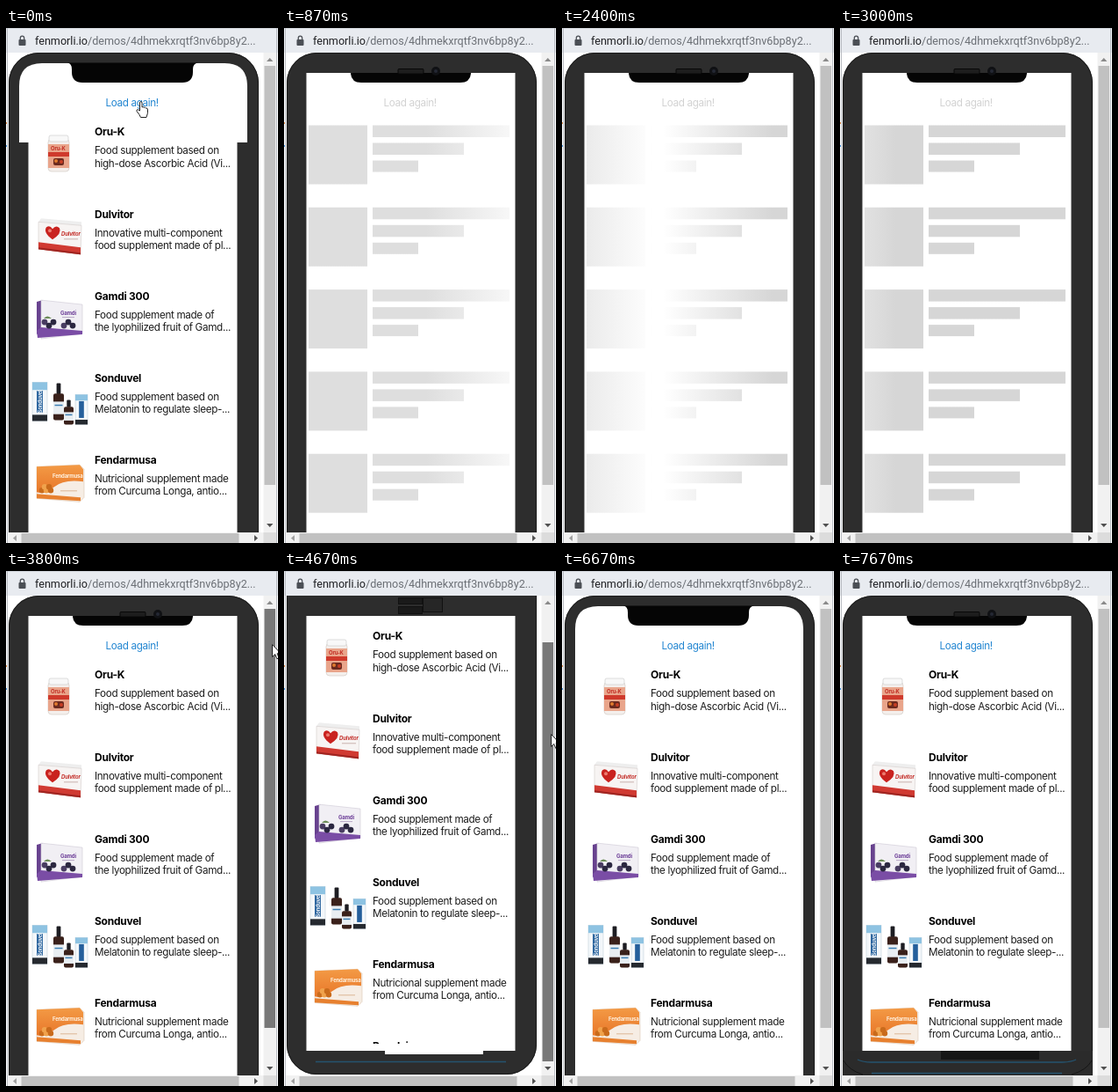
An HTML page that plays this animation: 310 px wide and 585 px high, repeating every 8340 ms.

```html
<!DOCTYPE html>
<html lang="en">
<head>
<meta charset="utf-8">
<title>Product list with loading placeholder</title>
<style>
html, body { margin: 0; width: 100%; height: 100%; overflow: hidden; background: #fff; }
svg { display: block; width: 310px; height: 585px; }
text { font-family: Inter, Roboto, sans-serif; font-size: 11.7px; letter-spacing: -.35px; fill: #1c1c1c; }
.name { font-size: 12px; font-weight: 700; letter-spacing: -.25px; fill: #000; }
.url { font-family: Roboto, sans-serif; font-size: 12.6px; letter-spacing: 0; fill: #6b6f75; }
.tiny { font-size: 6px; font-weight: 700; letter-spacing: -.2px; }
</style>
</head>
<body>
<svg viewBox="0 0 310 585">
  <defs>
    <linearGradient id="shine" gradientUnits="userSpaceOnUse" x1="-130" x2="130" y1="0" y2="0">
      <stop offset="0" stop-color="#dedede"/>
      <stop offset=".48" stop-color="#fff"/>
      <stop offset=".52" stop-color="#fff"/>
      <stop offset="1" stop-color="#d6d6d6"/>
    </linearGradient>
    <linearGradient id="orange" x2="0" y2="1">
      <stop offset="0" stop-color="#f39a45"/>
      <stop offset="1" stop-color="#e8772a"/>
    </linearGradient>
    <clipPath id="view"><rect id="viewBox" x="15" y="51" width="260"/></clipPath>
    <clipPath id="peek"><rect y="570" width="310" height="11"/></clipPath>
  </defs>

  <rect width="310" height="585" fill="#fff"/>

  <g id="body">
    <rect x="3" y="28" width="285" height="588" rx="34" fill="#2d2d2d"/>
    <rect x="3.5" y="28.5" width="284" height="587" rx="34" fill="none" stroke="#1b1b1b"/>
    <path d="M36 601.500H253" stroke="#24536f" stroke-width="1.500"/>
  </g>
  <path id="wide" fill="#fff"/>
  <rect id="narrow" x="25.500" y="51" width="238" fill="#fff"/>
  <g id="residue" fill="#1a1a1a" stroke="#111">
    <rect x="130.500" y="30.500" width="27" height="7"/>
    <rect x="130.500" y="40.500" width="27" height="8"/>
    <rect x="158.500" y="30.500" width="22" height="16" fill="#262626"/>
  </g>

  <g clip-path="url(#view)">
    <g id="content">
      <path id="notch" d="M76 50.500H213V52Q212 62 201 62H88Q77 62 76 52Z" fill="#050505"/>
      <text id="load" x="113.500" y="89">Load again!</text>
      <g id="list"></g>
      <g id="bones" fill="url(#shine)"></g>
    </g>
  </g>
  <g id="tallNotch">
    <path d="M70 39.500H219Q213 40 213 47V50Q213 62 201 62H87Q75 62 75 50V47Q75 40 70 39.500Z" fill="#050505"/>
  </g>
  <g id="sensors">
    <rect x="130" y="46.500" width="29" height="5.500" rx="1" fill="#1d1d1d" stroke="#080808"/>
    <circle cx="173" cy="49" r="5" fill="#101114"/>
    <circle cx="173" cy="49" r="2" fill="#242833"/>
  </g>
  <rect id="homeBar" x="115" y="545" width="112" height="4" fill="#fff"/>
  <g id="foot">
    <rect x="3" y="545" width="285" height="28" fill="#2b2b2b"/>
    <rect x="115" y="545" width="112" height="10" fill="#161616"/>
    <path d="M20 555Q26 558 36 558H253Q263 558 269 555M36 570.500H253" fill="none" stroke="#24536f" stroke-width="1.300"/>
    <path d="M4 556Q10 567 26 572M287 556Q281 567 264 572" fill="none" stroke="#151515"/>
  </g>

  <rect x="293.500" y="28" width="14.500" height="545" fill="#f1f1f1"/>
  <rect id="thumb" x="294.500" width="12.500" height="476"/>
  <path d="M297 38L300.700 34L304.400 38Z" fill="#8a8a8a"/>
  <path d="M297 563L300.700 567L304.400 563Z" fill="#505050"/>
  <rect x="2" y="573" width="306" height="12" fill="#f1f1f1"/>
  <rect x="17.500" y="574" width="248" height="11" fill="#c1c1c1"/>
  <path d="M12 576L8 579.500L12 583Z" fill="#a0a0a0"/>
  <path d="M283 576L287 579.500L283 583Z" fill="#505050"/>
  <rect x="293.500" y="573" width="14.500" height="12" fill="#dcdcdc"/>

  <rect width="310" height="28" fill="#e8ebf0"/>
  <path d="M0 .5H310" stroke="#cfd3da"/>
  <path d="M1.500 0V585M308.500 0V585" stroke="#b9bcc2"/>
  <path d="M0 108h1" stroke="#e8914a" stroke-width="2"/>
  <path d="M0 134h1" stroke="#4a9be8" stroke-width="2"/>
  <rect x="14.500" y="13" width="8" height="7" rx="1" fill="#4b4f55"/>
  <path d="M16.300 13V11.500a2.200 2.400 0 0 1 4.400 0V13" fill="none" stroke="#4b4f55" stroke-width="1.300"/>
  <text class="url" x="33" y="18.500"><tspan fill="#202124">fenmorli.io</tspan>/demos/4dhmekxrqtf3nv6bp8y2...</text>

  <path id="hand" transform="translate(148 83)" fill="#fff" stroke="#222" stroke-linejoin="round"
    d="M4.500 11V2Q4.500 .5 5.700 .5T7 2V7Q8 6 9.300 7.300Q10.500 6.500 11.400 8Q13.500 7.500 13.500 10V13.500L12 18.500H5.500L4 15.500L1 11.500Q.5 9.500 2.500 9.700Z"/>
  <path id="arrow" fill="#fff" stroke="#222" stroke-linejoin="round"
    d="M.5 .5V14.500L3.700 11.500L5.900 16.700L8.200 15.700L6 10.700H10.300Z"/>
</svg>
<script>
const $ = id => document.getElementById(id);
const LOOP = 8340, PITCH = 93.3;
const LOAD_START = 200, LOAD_END = 3470, WIDE_START = 5400, WIDE_END = 7470, MAX_SCROLL = 44;

const items = [
  ['Oru-K', 'Food supplement based on', 'high-dose Ascorbic Acid (Vi...'],
  ['Dulvitor', 'Innovative multi-component', 'food supplement made of pl...'],
  ['Gamdi 300', 'Food supplement made of', 'the lyophilized fruit of Gamd...'],
  ['Sonduvel', 'Food supplement based on', 'Melatonin to regulate sleep-...'],
  ['Fendarmusa', 'Nutricional supplement made', 'from Curcuma Longa, antio...']
];

const rect = (x, y, w, h, fill, more = '') =>
  `<rect x="${x}" y="${y}" width="${w}" height="${h}" fill="${fill}" ${more}/>`;
const path = (d, fill, more = '') => `<path d="${d}" fill="${fill}" ${more}/>`;
const dot = (x, y, r, fill) => `<circle cx="${x}" cy="${y}" r="${r}" fill="${fill}"/>`;
const tiny = (x, y, fill, s, more = '') => `<text class="tiny" x="${x}" y="${y}" style="fill:${fill}" ${more}>${s}</text>`;

const bottle = (x, y, w, h) =>
  rect(x + w * .3, y, w * .4, h * .3, '#1d1d22', 'rx="1"') +
  rect(x, y + h * .28, w, h * .72, '#3a211b', 'rx="2"') +
  rect(x, y + h * .5, w, h * .34, '#e9eef2') +
  rect(x + 1.5, y + h * .58, w - 3, 1.5, '#3d7fb4');

const carton = (x, y, w, h) =>
  rect(x, y, w, h, '#f3f7fa', 'stroke="#c3d0da" stroke-width=".6"') +
  rect(x, y, w, h * .2, '#8ec3e2') +
  rect(x + w * .3, y + h * .22, w * .4, h * .56, '#245f9b') +
  rect(x, y + h * .84, w, h * .16, '#25292f');

// Product drawings, relative to the top of each row
const art = [
  rect(48, 16, 24, 37, '#f4efec', 'rx="4" stroke="#d5cdc8" stroke-width=".7"') +
  rect(49, 12, 22, 7, '#f8f8f8', 'rx="2" stroke="#cfcfcf" stroke-width=".7"') +
  rect(48, 22, 24, 27, '#e9a58b') + rect(48, 31, 24, 5, '#cf3a2c') +
  rect(54, 38, 12, 8, '#6b2a1f', 'rx="2"') + dot(57, 41, 2, '#e07a2f') + dot(63, 42, 2, '#c93e25') +
  tiny(51, 29, '#c22f25', 'Oru-K'),

  path('M37 17L40 13L86 17V22L37 20Z', '#eee') +
  path('M37 17L86 21L85 54L37 48Z', '#f7f4f3', 'stroke="#d4cdcb" stroke-width=".6"') +
  path('M37 40L85 46V54L37 48Z', '#d03a32') + path('M37 46L85 52V54L37 48Z', '#9f2420') +
  path('M53 37Q42 29 46 23Q50 20 53 25Q57 20 61 24Q64 30 53 37Z', '#c9221f') + dot(50, 27, 2, '#ec7b70') +
  tiny(63, 33, '#c4302b', 'Dulvitor', 'font-style="italic"') + rect(66, 36, 16, 1, '#c9b2ae'),

  path('M35 14L42 12V46L35 51Z', '#68428f') +
  path('M40 12L87 17V50L40 56Z', '#f1eff4', 'stroke="#cfc9d6" stroke-width=".6"') +
  path('M35 47L40 43L87 47V51L36 55Z', '#7a4da5') +
  [44, 49, 54, 66, 71, 76].map((x, i) => dot(x, 37 + i % 2 * 4, 3.4, i % 3 ? '#2b2740' : '#493d62')).join('') +
  path('M43 33Q47 28 52 33Z', '#6b8c57') +
  tiny(62, 29, '#6d3f98', 'Gamdi') + rect(64, 31, 14, 1, '#b6a8c6'),

  carton(30, 12, 17, 44) + tiny(0, 0, '#f4f8fb', 'Sonduvel', 'transform="translate(40.500 47) rotate(-90)"') +
  bottle(54, 13, 12, 42) + bottle(66, 32, 11, 28) + carton(79, 26, 14, 34),

  path('M35 15L84 13L89 18V50L84 55L35 51Z', '#f6ede4', 'stroke="#dcc6b3" stroke-width=".6"') +
  path('M35 15L84 13L88 18V32Q66 29 55 38T35 44Z', 'url(#orange)') +
  path('M35 46L85 50V54L35 51Z', '#e7802f') +
  [41, 46, 51, 44, 49].map((x, i) => dot(x, i < 3 ? 42 : 38, 3.2, i % 2 ? '#f0a24c' : '#c96b1c')).join('') +
  tiny(53, 28, '#fff3e2', 'Fendarmusa') + rect(62, 42, 19, 1, '#dcb795')
];

$('list').innerHTML = items.map(([name, a, b], i) =>
  `<g transform="translate(0 ${110 + i * PITCH - (i > 3 ? .4 : 0)})">
    <g transform="translate(0 ${i > 1 ? 0.5 : 0})">${art[i]}</g>
    <text class="name" x="101" y="12.300">${name}</text>
    <text x="101" y="33.300">${a}</text><text x="101" y="47.600">${b}</text></g>`).join('') +
  '<text class="name" x="101" y="588" clip-path="url(#peek)">Revolsin</text>';

$('bones').innerHTML = items.map((_, i) => {
  const y = 110.5 + i * PITCH;
  return [[28, 0, 67, 67], [101, 0, 156, 13.5], [101, 20, 104, 13.5], [101, 40, 52, 13]]
    .map(([x, dy, w, h]) => `<rect x="${x}" y="${y + dy}" width="${w}" height="${h}"/>`).join('');
}).join('');

const set = (id, attrs) => { for (const k in attrs) $(id).setAttribute(k, attrs[k]); };
const show = (id, on) => { $(id).style.display = on ? '' : 'none'; };
const clamp = (v, lo, hi) => Math.min(hi, Math.max(lo, v));

// Pointer stops: time, x, y
const stops = [
  [3600, 312, 74], [3790, 303, 83], [4420, 304, 185], [4700, 304, 185],
  [5330, 303, 74], [5600, 290, 62], [5760, 290, 62], [6070, 314, 48]
];

function pointer(t) {
  const i = stops.findIndex(s => s[0] > t);
  if (i < 1) return null;
  const [t0, x0, y0] = stops[i - 1], [t1, x1, y1] = stops[i];
  const p = (t - t0) / (t1 - t0), e = p * p * (3 - 2 * p);
  return [x0 + (x1 - x0) * e, y0 + (y1 - y0) * e];
}

function shineX(t) {
  const from = -102, travel = 489, period = 940;
  return from + ((t - 1054 + 2 * period) % period) / period * travel;
}

function draw(t) {
  const loading = t >= LOAD_START && t < LOAD_END;
  const first = t < LOAD_START;
  const wide = t >= WIDE_START && t < WIDE_END;
  const foot = t >= WIDE_END;
  const at = pointer(t);
  const scroll = at && t < WIDE_START ? clamp((at[1] - 90) * 1.16, 0, MAX_SCROLL) : 0;
  const bottom = foot ? 545 : 589 - scroll;

  set('body', { transform: `translate(0 ${-scroll})` });
  set('content', { transform: `translate(0 ${-scroll})` });
  set('narrow', { height: bottom - 51 });
  set('viewBox', { height: bottom - 51 });
  show('wide', wide || first);
  set('wide', { d: `M15 ${first ? 130 : 589}V66Q15 40 41 40H249Q275 40 275 66V${first ? 130 : 589}Z` });

  show('notch', !wide && !first);
  show('tallNotch', wide || first);
  show('sensors', !wide && !first && scroll < 2);
  show('residue', scroll > 22);
  show('homeBar', scroll > 43);
  show('foot', foot);

  show('list', !loading);
  show('bones', loading);
  $('load').style.fill = loading ? '#d2d2d2' : '#2386d1';
  set('shine', { gradientTransform: `translate(${shineX(t)} 0)` });

  set('thumb', { y: 43 + scroll * 38 / MAX_SCROLL, fill: t > 3730 && t < 5400 ? '#787878' : '#c1c1c1' });
  show('hand', first);
  show('arrow', at);
  if (at) set('arrow', { transform: `translate(${at[0]} ${at[1]})` });
}

const start = performance.now();
function tick() {
  draw((performance.now() - start) % LOOP);
  requestAnimationFrame(tick);
}
tick();
</script>
</body>
</html>
```
